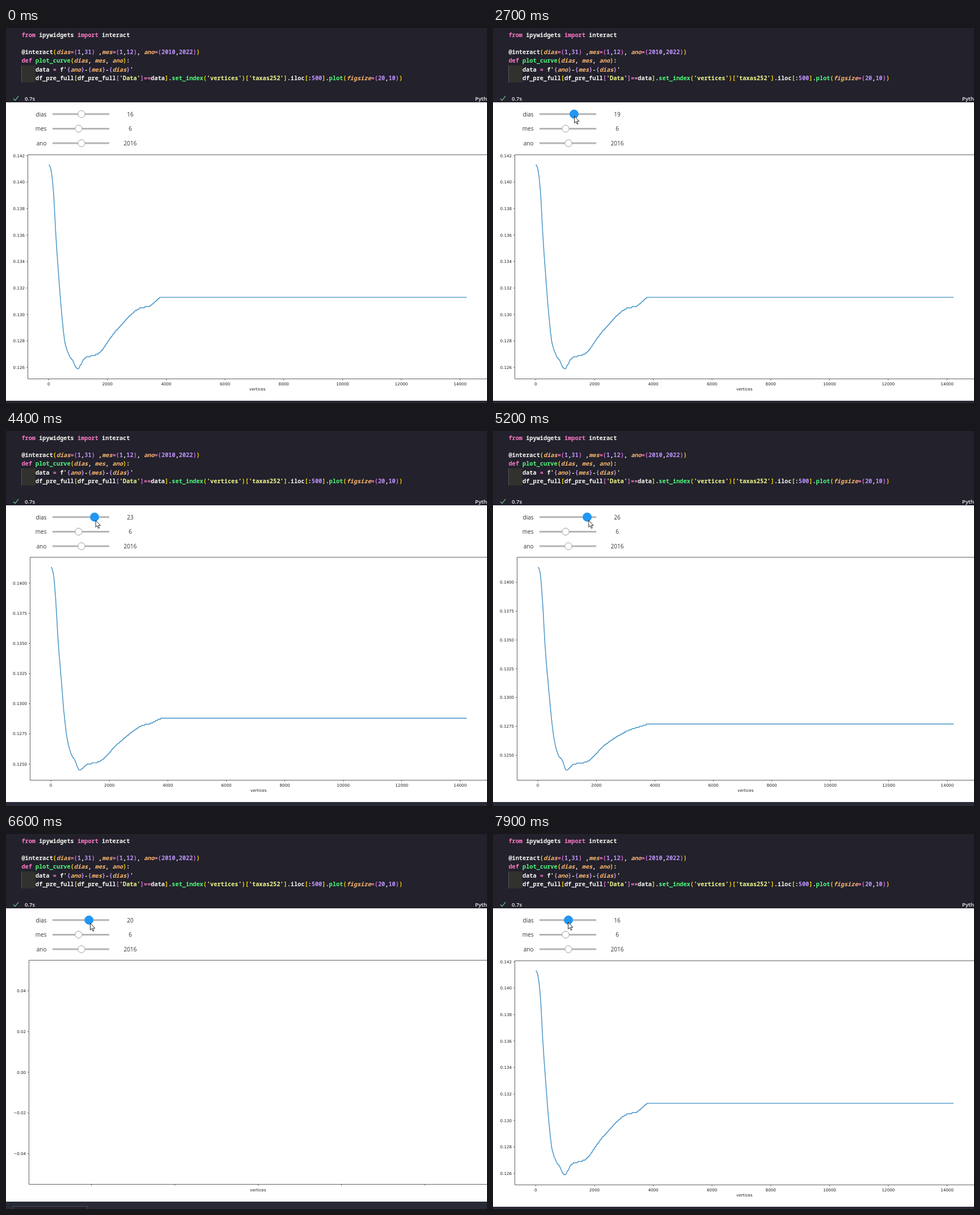
An HTML page for the animation above (8 s loop, 848 px wide and 661 px high).

```html
<!DOCTYPE html>
<html lang="pt">
<head>
<meta charset="utf-8">
<title>Interactive curve</title>
<style>
  html, body { margin: 0; width: 100%; height: 100%; overflow: hidden; background: #fff; }
  #stage { position: relative; width: 848px; height: 661px; overflow: hidden; }
  #cell { position: absolute; left: 0; top: 0; width: 848px; height: 131px; background: #22212c; }
  #indent { position: absolute; left: 27px; top: 66px; width: 25px; height: 30px; box-sizing: border-box;
            background: #31312d; border-left: 1px solid #55565c; }
  pre { position: absolute; left: 27.4px; top: 4.6px; margin: 0; color: #f8f8f2;
        font: 600 10.286px/15.23px "Noto Sans Mono", "DejaVu Sans Mono", monospace; }
  pre b { font-weight: inherit; }
  pre i { color: #ffb86c; }
  .k { color: #ff79c6; } .f { color: #50fa7b; } .s { color: #f1fa8c; }
  .n { color: #bd93f9; } .g { color: #ffd700; } .o { color: #da70d6; }
  svg { position: absolute; left: 0; top: 0; }
  .ui { font: 10px "Open Sans", "Noto Sans", sans-serif; fill: #333; }
  .status { font: 600 9.6px "Open Sans", "Noto Sans", sans-serif; fill: #f0f0ee; }
  .tick { font: 7.2px "DejaVu Sans", sans-serif; fill: #222; }
  .mid { text-anchor: middle; }
  .end { text-anchor: end; }
  .axis { fill: none; stroke: #626262; stroke-width: 1; }
  .curve { fill: none; stroke: #4592c6; stroke-width: 1.45; stroke-linejoin: round; }
  .track { stroke: #b5b5b5; stroke-width: 3; }
  .knob { fill: #fff; stroke: #9e9e9e; }
  .knob.on { fill: #2196f3; stroke: #2196f3; }
</style>
</head>
<body>
<div id="stage">
  <div id="cell">
    <div id="indent"></div>
<pre><b class="k">from</b> ipywidgets <b class="k">import</b> interact

@interact<b class="g">(</b><i>dias</i><b class="k">=</b><b class="o">(</b><b class="n">1</b>,<b class="n">31</b><b class="o">)</b> ,<i>mes</i><b class="k">=</b><b class="o">(</b><b class="n">1</b>,<b class="n">12</b><b class="o">)</b>, <i>ano</i><b class="k">=</b><b class="o">(</b><b class="n">2010</b>,<b class="n">2022</b><b class="o">)</b><b class="g">)</b>
<b class="k">def</b> <b class="f">plot_curve</b><b class="g">(</b><i>dias</i>, <i>mes</i>, <i>ano</i><b class="g">)</b>:
    data <b class="k">=</b> f<b class="s">'</b><b class="n">{</b><i>ano</i><b class="n">}</b><b class="s">-</b><b class="n">{</b><i>mes</i><b class="n">}</b><b class="s">-</b><b class="n">{</b><i>dias</i><b class="n">}</b><b class="s">'</b>
    df_pre_full<b class="g">[</b>df_pre_full<b class="o">[</b><b class="s">'Data'</b><b class="o">]</b><b class="k">==</b>data<b class="g">]</b>.<b class="f">set_index</b><b class="g">(</b><b class="s">'vertices'</b><b class="g">)[</b><b class="s">'taxas252'</b><b class="g">]</b>.iloc<b class="g">[</b>:<b class="n">500</b><b class="g">]</b>.<b class="f">plot</b><b class="g">(</b><i>figsize</i><b class="k">=</b><b class="o">(</b><b class="n">20</b>,<b class="n">10</b><b class="o">)</b><b class="g">)</b></pre>
  </div>
  <svg width="848" height="661" viewBox="0 0 848 661">
    <path d="M13 124.5l3 3.2l6-7.6" fill="none" stroke="#73c991" stroke-width="1.2"/>
    <text class="status" x="33" y="127.7">0.7s</text>
    <text class="status" x="827" y="127.7">Python</text>
    <g id="sliders"></g>
    <g id="plots"></g>
    <path id="cursor" d="M.5 .5V12.6L3.2 10L5.2 14.6L7 13.8L5 9.4H8.8Z" fill="#fff" stroke="#111" stroke-width=".9"/>
  </svg>
</div>
<script>
const $ = id => document.getElementById(id);
const text = (cls, x, y, s) => `<text class="${cls}" x="${x}" y="${y}">${s}</text>`;
const mix = (a, b, u) => a + (b - a) * u;
const clamp = (v, lo, hi) => Math.min(hi, Math.max(lo, v));

$("sliders").innerHTML = [["dias", 133, 16], ["mes", 128, 6], ["ano", 133, 2016]]
  .map(([name, x, value], i) => {
    const y = 151.7 + i * 25.7;
    return text("ui end", 71.5, y + 4, name) + text("ui mid", 219, y + 4, value) +
      `<path class="track" d="M82 ${y}H182"/><circle class="knob" cx="${x}" cy="${y}" r="6.2"/>`;
  }).join("");
const dayText = $("sliders").querySelectorAll("text")[1];
const knob = $("sliders").querySelector("circle");

// Rate curves in basis points at a few maturities; days between are mixed.
const LAST = 14220;
const terms = [0, 70, 150, 250, 350, 460, 560, 700, 820, 980, 1230, 1650, 2300, 3150, 3400, 3860];
const day16 = [1413, 1410, 1396, 1357, 1326, 1296, 1278, 1269, 1265, 1259, 1267, 1270, 1288, 1305, 1306, 1313];
const day20 = [1413, 1410, 1395, 1359, 1330, 1296, 1278, 1266, 1260, 1253, 1257, 1260, 1275, 1292, 1293, 1299];
const day24 = [1413, 1409, 1387, 1343, 1313, 1283, 1263, 1250, 1246, 1237, 1242, 1244, 1259, 1272, 1274, 1277];
const ratesOn = day => day === 16 ? day16 : day20.map((v, i) => mix(v, day24[i], (day - 20) / 4));

// Monotone cubic through the keys, rounded to whole basis points.
function sample(rates) {
  const slope = terms.slice(1).map((x, i) => (rates[i + 1] - rates[i]) / (x - terms[i]));
  const tangent = terms.map((_, i) => {
    const a = slope[i - 1], b = slope[i];
    return a * b > 0 ? 2 * a * b / (a + b) : 0;
  });
  const pts = [];
  for (let i = 0, x = 0; x < terms.at(-1); x += 20) {
    while (x >= terms[i + 1]) i++;
    const h = terms[i + 1] - terms[i], u = (x - terms[i]) / h, w = 1 - u;
    pts.push([x, Math.round(w * w * ((1 + 2 * u) * rates[i] + u * h * tangent[i]) +
      u * u * ((3 - 2 * u) * rates[i + 1] - w * h * tangent[i + 1]))]);
  }
  const end = Math.round(rates.at(-1));
  return [...pts, [terms.at(-1), end], [LAST, end]];
}

// Axis limits with a 5% margin on both sides.
function scale(min, max, from, to) {
  const pad = (max - min) / 20, lo = min - pad, hi = max + pad;
  const at = v => mix(from, to, (v - lo) / (hi - lo));
  const ticks = step => {
    const list = [];
    for (let k = Math.ceil(lo / step); k * step <= hi; k++) list.push(k * step);
    return list;
  };
  return { at, ticks };
}

function draw(day) {
  const pts = day ? sample(ratesOn(day)) : [];
  const vals = day ? pts.map(p => p[1]) : [-500, 500];
  const min = Math.min(...vals), max = Math.max(...vals);
  const wide = day && (max - min) * 1.1 > 180;
  const [left, top, bottom, bar] = !day ? [40.5, 222.5, 617.5, 648] : wide ? [42.5, 222.5, 615.5, 654] :
    day === 16 ? [38.5, 223.5, 618.5, 657] : [38.5, 222.5, 617.5, 656];
  const xs = day ? scale(0, LAST, left, 848.8) : scale(-500, 500, left, 848.8);
  const ys = scale(min, max, bottom, top);
  let axis = `M860 ${top}H${left}V${bottom}H860`, labels = "";
  for (const v of ys.ticks(!day ? 200 : wide ? 25 : 20)) {
    const y = ys.at(v);
    axis += `M${left} ${y}h-2.5`;
    const s = (v / 1e4).toFixed(!day ? 2 : wide ? 4 : 3).replace("-", "\u2212");
    labels += text("tick end", left - 5.3, y + 2.6, s);
  }
  for (const v of xs.ticks(day ? 2000 : 200)) {
    axis += `M${xs.at(v)} ${bottom}v2.5`;
    if (day) labels += text("tick mid", xs.at(v), bottom + 11.1, v);
  }
  labels += text("tick mid", (left + 848) / 2, bottom + (day ? 20.9 : 12.4), "vertices");
  const line = pts.map(([x, v]) => [xs.at(x).toFixed(2), ys.at(v).toFixed(2)]).join(" ");
  return `<g id="day${day}"><rect y="${bar}" width="848" height="20" fill="#282a36"/>` +
    `<rect x="12.5" y="${bar + 8.5}" width="131" height="20" fill="#22212c" stroke="#4a4c58"/>` +
    `<path class="axis" d="${axis}"/>${labels}<polyline class="curve" points="${line}"/></g>`;
}

// Time and the day whose curve appears; 0 is a day without data.
const shows = [[0, 16], [2900, 0], [3500, 20], [4000, 21], [4400, 22], [4900, 24],
  [5300, 0], [5500, 27], [6300, 0], [6900, 20], [7700, 0], [7800, 16]];
const days = [...new Set(shows.map(s => s[1]))];
$("plots").innerHTML = days.map(draw).join("");

// Drag strokes: start, end, final pointer x
const drags = [[2000, 2100, 133], [2200, 3000, 149], [3200, 3600, 151], [3700, 4100, 155], [4200, 4500, 159],
  [4600, 5000, 167], [5100, 5500, 172], [5900, 6600, 148], [6700, 7400, 135], [7600, 7900, 132]];

function pointer(t) {
  if (t < 900) {
    const s = clamp((t - 200) / 600, 0, 1), swing = Math.sin(Math.PI * s);
    return [mix(18, 123, s) + 758 * swing, mix(-14, 191, s) + 536 * swing];
  }
  if (t < 2000) {
    const s = clamp((t - 900) / 500, 0, 1);
    return [mix(123, 131, s), mix(191, 153, s)];
  }
  const x = drags.reduce((x, [a, b, to]) => mix(x, to, clamp((t - a) / (b - a), 0, 1)), 131);
  return [x, clamp(155 + (x - 143) / 3, 155, 157)];
}

const start = performance.now();
function frame() {
  const t = Math.floor(((performance.now() - start) % 8000) / 100) * 100;
  const [x, y] = pointer(t);
  const day = t < 2000 ? 16 : Math.max(16, 16 + Math.floor((x - 133) / 3.3));
  const on = t >= 1300;
  $("cursor").setAttribute("transform", `translate(${x} ${y})`);
  knob.setAttribute("cx", 133 + (day - 16) * 3.3);
  knob.setAttribute("r", on ? 7.5 : 6.2);
  knob.classList.toggle("on", on);
  dayText.textContent = day;
  const shown = shows.filter(s => s[0] <= t).pop()[1];
  for (const d of days) $("day" + d).style.display = d === shown ? "" : "none";
  requestAnimationFrame(frame);
}
frame();
</script>
</body>
</html>
```
